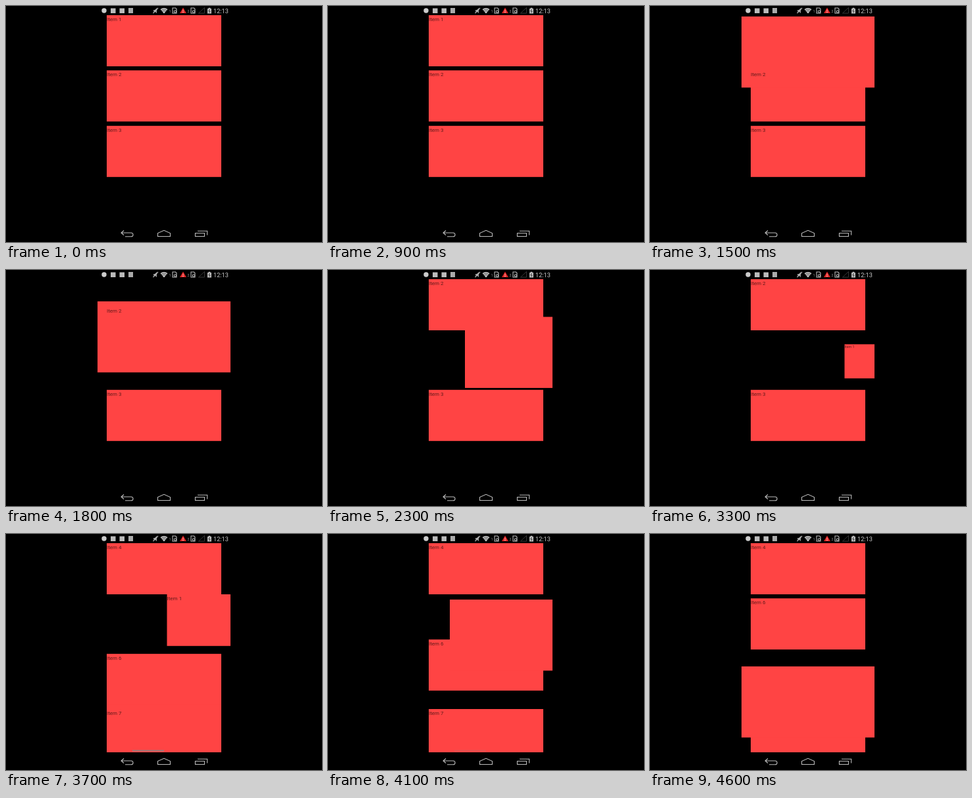
Write an HTML page that moves like this. It is 480x360 px and loops after 4.7 s.

```html
<!DOCTYPE html>
<html lang="en">
<head>
<meta charset="utf-8">
<title>Drag between pages</title>
<style>
  html, body { margin: 0; width: 100%; height: 100%; overflow: hidden; background: #000; }
  svg { display: block; width: 480px; height: 360px; }
  text { font-family: Roboto, sans-serif; }
  .card { fill: #f44; }
  .label { font-size: 8px; fill: #000; fill-opacity: .62; }
  .line { fill: none; stroke: #bbb; stroke-width: 1.1; }
  .tiny { font-size: 5.5px; fill: #999; }
</style>
</head>
<body>
<svg viewBox="0 0 480 360">
  <defs>
    <clipPath id="screen"><rect x="139" width="202" height="360"/></clipPath>
    <clipPath id="content"><rect x="139" width="202" height="333"/></clipPath>
    <g id="sim">
      <path class="line" d="M-3 -4H1.5L3 -2.5V4H-3Z"/>
      <circle class="line" cx="1" cy="1.5" r="1.7"/>
    </g>
  </defs>
  <rect width="480" height="360"/>

  <g clip-path="url(#content)">
    <g id="pageA"></g>
    <g id="pageB"><rect id="bridge" class="card" x="153" y="260" width="174" height="8"/></g>
  </g>
  <g clip-path="url(#screen)">
    <g id="drag"></g>
    <g id="front"></g>
    <rect id="thumb" y="329.5" width="48" height="2" fill="#888"/>
  </g>

  <g id="status">
    <circle cx="149" cy="7" r="3.7" fill="#ccc"/>
    <rect x="159" y="3.5" width="7.5" height="7.5" fill="#bbb"/>
    <rect x="172.500" y="3.5" width="7.5" height="7.5" fill="#bbb"/>
    <rect x="186" y="3" width="7" height="8" fill="#aaa"/>
    <path d="M224 6h2l3-3v8l-3-2.500h-2z" fill="#999"/>
    <path class="line" d="M223.500 11L231 3"/>
    <path d="M234.500 5Q240 .8 245.500 5L240 11.500Z" fill="#ccc"/>
    <path d="M236 6.300Q240 3.600 244 6.300M237.500 8.200Q240 6.500 242.500 8.200" fill="none" stroke="#000" stroke-width=".6"/>
    <text class="tiny" x="247.500" y="9.500">1</text>
    <use href="#sim" x="256" y="7"/>
    <path d="M264 11L269 2.500L274 11Z" fill="#d22"/>
    <path d="M269 5.500V8M267.500 9.300H270.500" stroke="#fbb" stroke-width="1"/>
    <text class="tiny" x="275.500" y="9.500">2</text>
    <use href="#sim" x="284" y="7"/>
    <path d="M292.500 11H301.500V2.500Z" fill="none" stroke="#444" stroke-width=".8"/>
    <path d="M306 4H307.500V2.800H310.500V4H312V11.500H306Z" fill="#bbb"/>
    <path d="M309.500 5L307.800 8H310.200L308.700 10.300" fill="none" stroke="#222" stroke-width=".8"/>
    <text x="315" y="10.500" font-size="9.200" fill="#ccc">12:13</text>
  </g>

  <g class="line">
    <path d="M179 342.500L175 346L179 349.500M175 346H190Q193 346 193 349Q193 351.800 190 351.800H181"/>
    <path d="M230.500 351.500V346.500L240 342.300L249.500 346.500V351.500Z"/>
    <path d="M287.500 346.500H301.500V351.500H287.500ZM291 343.200H305.700V349.500"/>
  </g>
</svg>
<script>
const LOOP = 4700, STEP = 100, PITCH = 202;
const LEFT = 153, WIDTH = 174, HEIGHT = 78;
const ROWS = [14, 98.2, 182.8, 267];
const $ = id => document.getElementById(id);

function add(parent, tag, attrs, text = '') {
  const el = document.createElementNS('http://www.w3.org/2000/svg', tag);
  for (const key in attrs) el.setAttribute(key, attrs[key]);
  el.textContent = text;
  return parent.appendChild(el);
}

function card(parent, n, labelParent) {
  const g = add(parent, 'g', {});
  add(g, 'rect', { class: 'card', width: WIDTH, height: HEIGHT });
  const holder = labelParent ? add(labelParent, 'g', {}) : g;
  const label = add(holder, 'text', { class: 'label', x: 0, y: 9 }, 'Item ' + n);
  return { g, holder, label };
}

function place(item, x, y, s = 1) {
  const move = `translate(${x} ${y}) scale(${s})`;
  item.g.setAttribute('transform', move);
  item.holder.setAttribute('transform', move);
}

const show = (el, on) => el.setAttribute('visibility', on ? 'visible' : 'hidden');
const ramp = (t, a, b) => Math.min(1, Math.max(0, (t - a) / (b - a)));
const easeOut = p => 1 - (1 - p) ** 2;
const smooth = p => p * p * (3 - 2 * p);
const mix = (a, b, p) => a + (b - a) * p;

const [one, three] = [1, 3].map(n => card($('pageA'), n));
const two = card($('pageA'), 2, $('front'));
const [four, six, seven] = [4, 6, 7].map(n => card($('pageB'), n));
const drag = card($('drag'), 1);

// time, left, top, scale of the dragged card
const path = [
  [900, 153, 14, 1],
  [1100, 119, 14, 1.39],
  [1500, 119, 16, 1.39],
  [2000, 148, 69, 1.39],
  [2300, 208, 71.5, 1.39],
  [2550, 208, 71.5, 1.39],
  [2700, 213, 75, 1.256],
  [3300, 295.5, 113.3, 0.667],
  [3700, 244.5, 92, 1.01],
  [3900, 219, 81, 1.2],
  [4100, 185, 100, 1.39],
  [4400, 119, 200, 1.39],
  [4600, 119, 202, 1.39]
];

function along(t) {
  const i = Math.max(1, path.findIndex(k => k[0] >= t));
  const a = path[i - 1], b = path[i], p = ramp(t, a[0], b[0]);
  return [1, 2, 3].map(j => mix(a[j], b[j], p));
}

function draw(t) {
  const dragging = t >= 900;
  const page = easeOut(ramp(t, 3300, 3700));
  const xA = LEFT - PITCH * page, xB = xA + PITCH;

  place(one, xA, ROWS[0]);
  place(two, xA, mix(ROWS[1], ROWS[0], smooth(ramp(t, 1600, 2000))));
  place(three, xA, ROWS[2]);
  show(one.g, !dragging);

  const shift = smooth(ramp(t, 4000, 4300));
  place(four, xB, ROWS[0]);
  place(six, xB, mix(ROWS[2], ROWS[1], shift));
  place(seven, xB, ROWS[3]);
  show($('bridge'), page === 1 && shift === 0);

  show($('drag'), dragging);
  if (dragging) {
    const [x, y, s] = along(t);
    place(drag, x, y, s);
    drag.label.setAttribute('opacity', s < 1.2 ? 1 : 0);
  }

  $('thumb').setAttribute('x', mix(139, 192, page));
  $('thumb').setAttribute('opacity', t > 3300 ? 0.85 * (1 - ramp(t, 3800, 4200)) : 0);
}

function tick() {
  const t = performance.now() % LOOP;
  draw(Math.floor(t / STEP) * STEP);
  requestAnimationFrame(tick);
}
tick();
</script>
</body>
</html>
```
